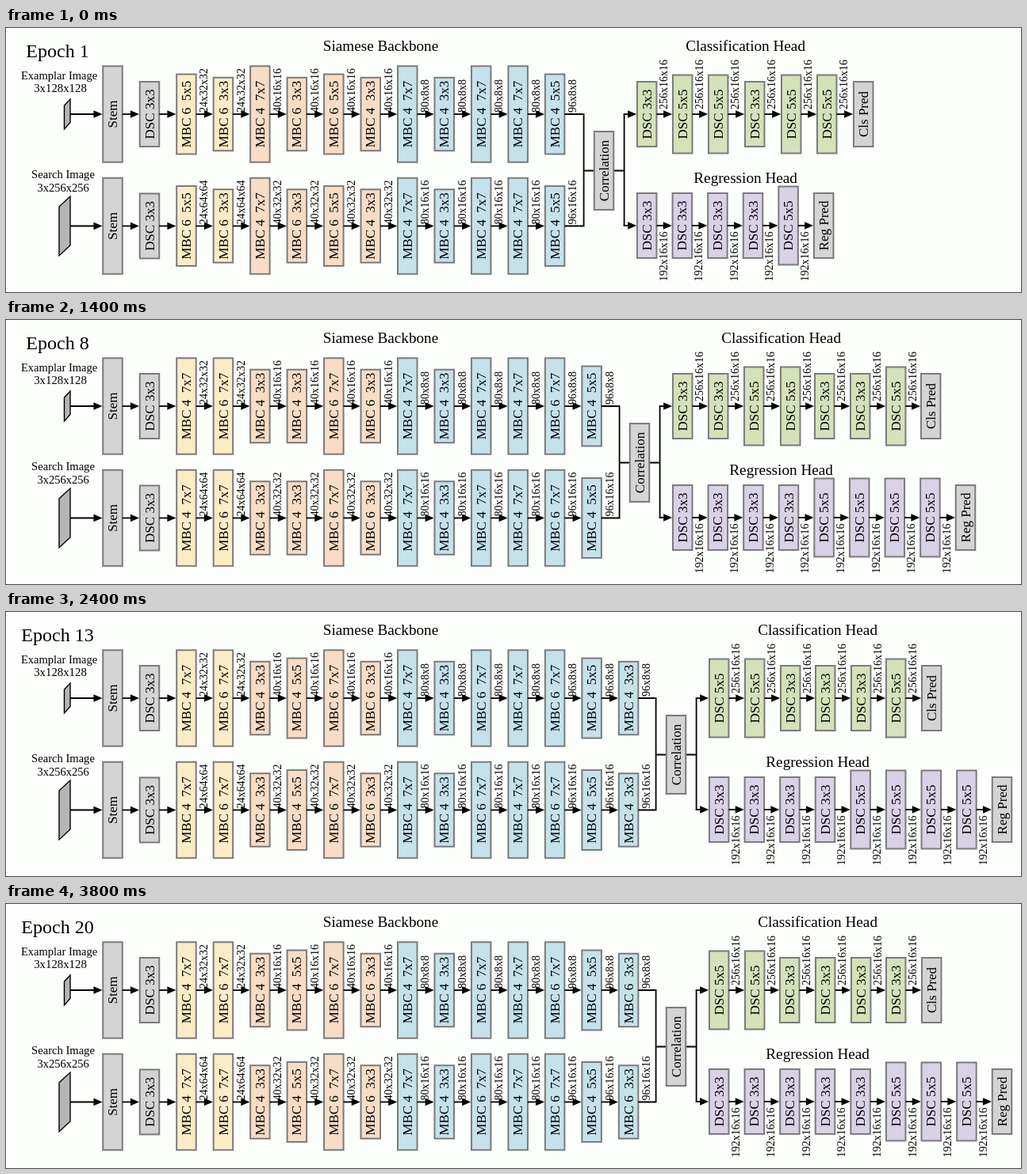
An HTML page for the animation above (4 s loop, 1280 by 334 pixels).

```html
<!DOCTYPE html>
<html lang="en">
<head>
<meta charset="utf-8">
<title>Architecture search</title>
<style>
  html, body { margin: 0; width: 100%; height: 100%; overflow: hidden; background: #fcfefb; }
  svg { display: block; width: 100vw; height: 100vh; }
  text { font-family: "Liberation Serif", "Times New Roman", serif; fill: #000; }
  rect { stroke: #7b7b7b; stroke-width: 2; }
  .wire { fill: none; stroke: #000; stroke-width: 1.8; }
</style>
</head>
<body>
<svg id="stage" viewBox="0 0 1280 334"></svg>
<script>
const STEP = 200, EPOCHS = 20;
const COLOR = { gray: '#d4d4d4', yellow: '#faecc5', orange: '#f8dcc5', blue: '#c5e1e9', green: '#d4e1b9', purple: '#d9d1e5' };
const MBC_HEIGHT = { 3: 92.5, 5: 101, 7: 121.5 };
const DSC_HEIGHT = { 3: 82, 5: 99 };
const PITCH = 46.47, WIDTH = 24.5, TOP = 109, BOTTOM = 250.5;

// Each entry overrides the previous epoch. mbc: kernel and expansion per block,
// cls / reg: kernel per block, gaps: block spacing of the cls head beyond 40 px.
const changes = {
  1: { mbc: '56 36 74 36 56 34 74 34 74 74 54', cls: '355355', gaps: '556656', reg: '33335', clsCh: 256, regCh: 192 },
  2: { mbc: '74 36 74 36 56 34 74 34 74 74 54', clsCh: 128 },
  3: { mbc: '74 36 74 34 56 34 74 34 74 74 54', clsCh: 256 },
  4: { mbc: '74 76 34 34 76 36 74 34 74 74 76 74', cls: '3335355', gaps: '5467554', reg: '33335555', clsCh: 128 },
  6: { mbc: '74 76 34 34 76 36 74 34 74 74 76 54' },
  7: { cls: '33553355', gaps: '55635545', clsCh: 256, regCh: 128 },
  8: { cls: '3355335', gaps: '5563554', regCh: 192 },
  9: { cls: '335535', gaps: '556355' },
  11: { mbc: '74 76 34 54 76 36 74 56 34 74 76 54 34', cls: '55553355', gaps: '55655445' },
  12: { mbc: '74 76 74 54 76 36 74 56 34 74 76 54 34' },
  13: { mbc: '74 76 34 54 76 36 74 34 76 74 76 54 34', cls: '553335', gaps: '554545' },
  17: { mbc: '74 76 34 54 76 36 74 56 34 74 76 54 36', cls: '553333', reg: '33333555' },
  18: { cls: '5535355', gaps: '5545464' },
  19: { mbc: '74 76 34 54 76 36 74 34 74 74 76 54 36', cls: '553333', gaps: '545545' },
  20: { mbc: '74 76 34 54 76 36 74 34 76 74 76 54 36' }
};

const states = [];
for (let epoch = 1; epoch <= EPOCHS; epoch++) {
  states.push({ ...states[epoch - 2], ...changes[epoch] });
}

const text = (x, y, size, str) =>
  `<text x="${x}" y="${y}" font-size="${size}" text-anchor="middle">${str}</text>`;

const upright = (x, y, size, str, anchor) =>
  `<text transform="translate(${x} ${y}) rotate(-90)" font-size="${size}" text-anchor="${anchor}">${str}</text>`;

const label = (x, y, str) => upright(x, y, 14, str, 'start');

const block = (cx, cy, height, color, str) =>
  `<rect x="${cx - WIDTH / 2}" y="${cy - height / 2}" width="${WIDTH}" height="${height}" fill="${COLOR[color]}"/>` +
  upright(cx + 5.6, cy, 17, str, 'middle');

const wire = d => `<path class="wire" d="${d}"/>`;

const arrow = (x1, x2, y) =>
  wire(`M${x1} ${y}H${x2 - 8}`) + `<path d="M${x2} ${y}l-11 -4.7v9.4z"/>`;

const link = (cx1, cx2, y) => arrow(cx1 + WIDTH / 2, cx2 - WIDTH / 2 - 0.8, y);

const polygon = points =>
  `<polygon points="${points}" fill="#b6b6b6" stroke="#000" stroke-width="1.4"/>`;

function mbcStyle(i) {
  if (i < 2) return { color: 'yellow', channels: 24, size: 32 };
  if (i < 6) return { color: 'orange', channels: 40, size: 16 };
  return { color: 'blue', channels: i < 10 ? 80 : 96, size: 8 };
}

function backbone(mbc, cy, scale) {
  const at = i => 134.5 + PITCH * i;
  let out = block(at(0), cy, 121.5, 'gray', 'Stem') +
    block(at(1), cy, 82, 'gray', 'DSC 3x3') +
    arrow(81, at(0) - WIDTH / 2 - 0.8, cy) + link(at(0), at(1), cy);
  mbc.forEach(([kernel, expansion], i) => {
    const cx = at(i + 2), { color, channels, size } = mbcStyle(i);
    const side = size * scale;
    out += block(cx, cy, MBC_HEIGHT[kernel], color, `MBC ${expansion}\u00a0 ${kernel}x${kernel}`) +
      label(cx + 27, cy - 2, `${channels}x${side}x${side}`) +
      link(at(i + 1), cx, cy);
  });
  return out;
}

function head(kernels, centers, cy, color, channels, labelY, name) {
  let out = '';
  [...kernels].forEach((kernel, i) => {
    out += block(centers[i], cy, DSC_HEIGHT[kernel], color, `DSC ${kernel}x${kernel}`) +
      label(centers[i] + 25.3, labelY, `${channels}x16x16`) +
      link(centers[i], centers[i + 1], cy);
  });
  return out + block(centers[kernels.length], cy, 82, 'gray', name);
}

function draw(epoch) {
  const s = states[epoch - 1];
  const mbc = s.mbc.split(' ');
  const shift = Math.floor(45.5 * (mbc.length - 11));
  const lastEdge = 134.5 + PITCH * (mbc.length + 1) + WIDTH / 2;
  const corr = 754 + shift, join = corr - 25.4, split = corr + 25.6;
  const first = corr + 54.2, middle = 180.5;

  const clsCenters = [first];
  for (const gap of s.gaps) clsCenters.push(clsCenters.at(-1) + 40 + Number(gap));
  const regCenters = Array.from({ length: s.reg.length + 1 }, (_, i) => first + 44.6 * i);

  return text(65, 37, 24, `Epoch ${epoch}`) +
    text(472.5, 29, 19.2, 'Siamese Backbone') +
    text(932.6 + shift, 29, 19.2, 'Classification Head') +
    text(932.6 + shift, 196, 19.2, 'Regression Head') +
    text(67, 65, 14.5, 'Examplar Image') + text(68.5, 81, 14.8, '3x128x128') +
    text(72, 190, 14.6, 'Search Image') + text(72, 207, 14.5, '3x256x256') +
    polygon('73.5,98 81,90 81,119.5 73.5,128') +
    polygon('67,226 81,213 81,275 67,288') +
    backbone(mbc, TOP, 1) + backbone(mbc, BOTTOM, 2) +
    wire(`M${lastEdge} ${TOP}H${join}V${BOTTOM}H${lastEdge}M${join} ${middle}H${corr}H${split}M${split} ${TOP}V${BOTTOM}`) +
    block(corr, middle, 99, 'gray', 'Correlation') +
    arrow(split - 0.9, first - WIDTH / 2 - 0.8, TOP) +
    arrow(split - 0.9, first - WIDTH / 2 - 0.8, 250) +
    head(s.cls, clsCenters, TOP, 'green', s.clsCh, 103, 'Cls Pred') +
    head(s.reg, regCenters, 250, 'purple', s.regCh, 320.5, 'Reg Pred');
}

const stage = document.getElementById('stage');
const start = performance.now();
let shown = 0;

function update() {
  const time = Math.max(0, performance.now() - start);
  const epoch = Math.floor(time / STEP) % EPOCHS + 1;
  if (epoch !== shown) {
    stage.innerHTML = draw(epoch);
    shown = epoch;
  }
  requestAnimationFrame(update);
}
update();
</script>
</body>
</html>
```
